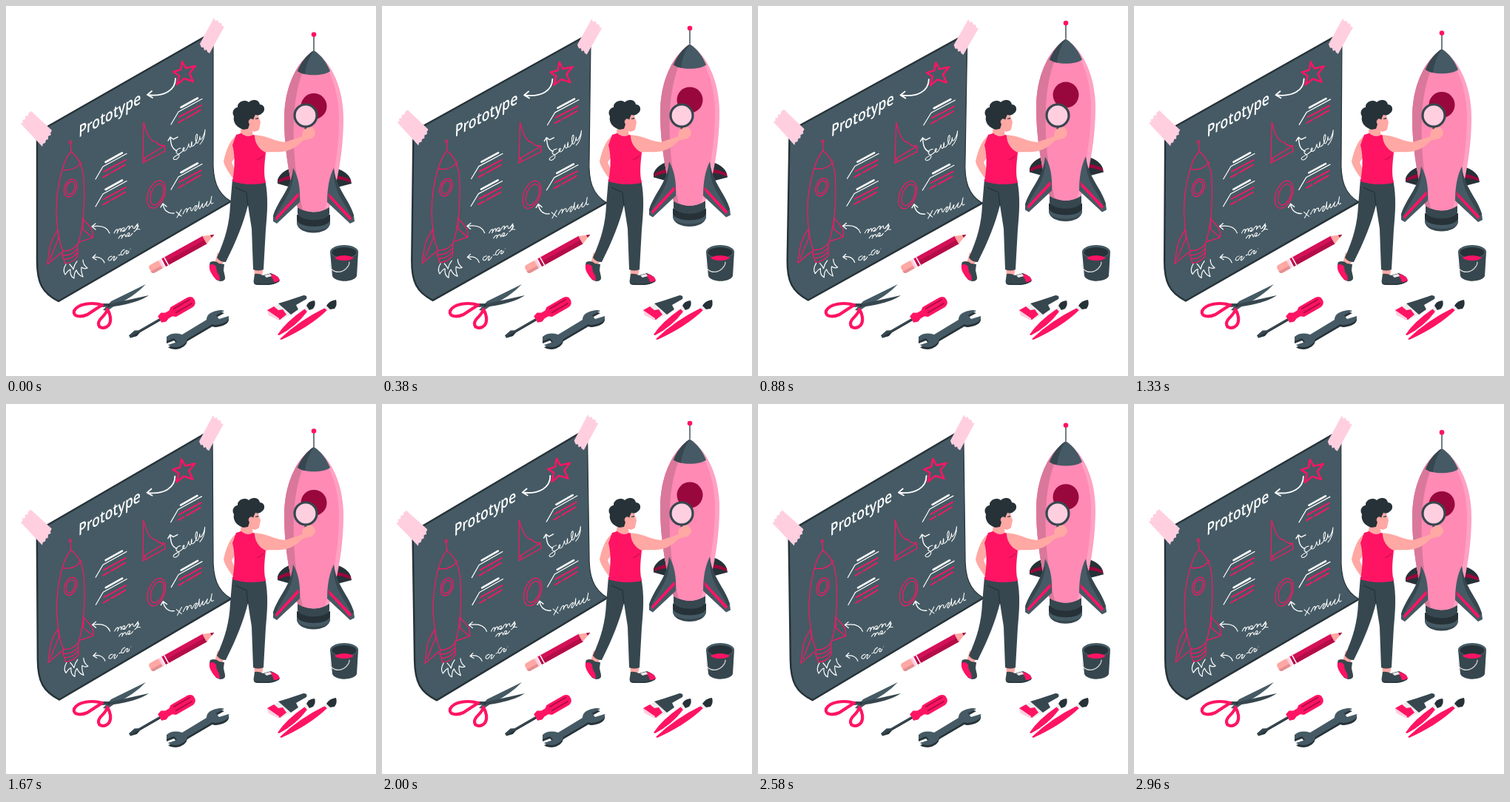
Animation of 500 by 500 pixels, one loop 3 s. Source, as an HTML page:

```html
<!DOCTYPE html>
<html lang="en">
<head>
<meta charset="utf-8">
<title>Rocket prototype</title>
<style>
  html, body { margin: 0; width: 100%; height: 100%; overflow: hidden; background: #fff; }
  svg { display: block; width: 100%; height: 100%; }
  .slate { fill: #455a64; } .dark { fill: #37474f; } .ink { fill: #263238; }
  .pink { fill: #ff1464; } .wine { fill: #99083c; } .pale { fill: #ffcfe0; } .skin { fill: #ffa8a4; }
  .metal { fill: #ececec; }
  .line { fill: none; stroke-linecap: round; stroke-linejoin: round; }
  .white { stroke: #fff; } .rose { stroke: #ff1464; }
  .title { font: 600 22.5px "Open Sans", sans-serif; fill: #fff; }
</style>
</head>
<body>
<svg viewBox="0 0 500 500" stroke-width="1.2">
  <defs>
    <g id="note" class="line">
      <path class="white" d="M121 234L131 217L163 199.500"/>
      <path class="white" stroke-width="2.600" d="M134.500 211L157 198.500"/>
      <path class="rose" stroke-width="1.800" d="M132 224L162 208M131 231.500L139 227M142 225.500L161 214.500"/>
    </g>
    <path id="spanner" d="M217 448Q225 441 238 445L271 425Q271 416 284 413Q291 411 295 413L284 419L288 424L301 420Q302 428 289 431Q282 433 279 431L245 451Q243 460 230 462Q222 462 219 459L231 455L227 450L217 454Z"/>
  </defs>

  <g id="poster">
    <path class="slate" d="M42 171L280 35V205C279 235 285 253 304 264L71 399C49 388 42 374 42 345Z"/>
    <path class="line" stroke="#263238" stroke-width="2.400" d="M280 35L42 171V345C42 374 49 388 71 399L304 264"/>
    <path class="line" stroke="#263238" d="M280 35V205C279 235 285 253 304 264"/>
    <text class="title" transform="matrix(.785 -.435 -.03 1 98 178)">Prototype</text>

    <use href="#note"/>
    <use href="#note" y="37"/>
    <use href="#note" x="102" y="-74"/>
    <use href="#note" x="102" y="14"/>

    <g class="line rose">
      <path stroke-width="2.500" d="M238 75L243 84L256 81L248 91L253 102L241 98L231 106L234 94L226 89L236 86Z"/>
      <circle cx="87" cy="184" r="1.700"/>
      <path d="M87 186L88 197M88 197C79 205 68 239 68 278C69 303 72 320 77 331Q89 332 97 322C105 300 107 264 105 232C103 213 96 203 88 197M76 221Q93 224 102 211"/>
      <ellipse cx="87" cy="246" rx="8" ry="12.500" transform="rotate(20 87 246)"/>
      <ellipse cx="87" cy="246" rx="5.500" ry="9" transform="rotate(20 87 246)"/>
      <path d="M70 303C64 312 59 320 58 334L56 349L75 333M70 303L71 314L59 343M104 287C108 295 119 298 117 313L99 319M104 287V302L117 313"/>
      <path d="M77 331L76 337Q89 338 97 328V322M76 337L78 342Q89 343 97 333V328M78 342L80 348Q91 347 97 338V333"/>
      <path d="M186 157L185 212L215 196L214 188Q208 190 203 184C194 183 190 172 186 157M186 206L214 189M188 205V209"/>
      <ellipse cx="203" cy="254.500" rx="11" ry="19.500" transform="rotate(20 203 254.500)"/>
      <ellipse cx="204" cy="254.500" rx="8" ry="15" transform="rotate(20 204 254.500)"/>
    </g>

    <g class="line white">
      <path d="M81 349Q76 357 80 363Q84 357 87 356Q86 365 92 368Q92 360 95 357Q98 364 104 366Q101 358 102 353Q106 356 110 354Q104 350 104 343M86 349Q89 352 91 356Q92 350 96 345"/>
      <path stroke-width="1.800" d="M229 98C229 113 215 123 191 120M197 115L191 120L198 124"/>
      <path d="M140 307C137 299 128 296 116 298M121 294L116 298L121 302M133 347C131 341 125 338 117 340M121 336L117 340L122 343"/>
      <path stroke-width="1.400" d="M231 196C223 192 223 186 222 177M219 182L222 177L226 180L232 177M227 280C219 281 213 276 212 267M209 272L212 267L217 271"/>
      <g stroke-width="1">
        <path d="M146 307q3-6 5-5q0 3-1 5q3-7 5-6q0 2 0 4q2-6 5-5q1 3-3 4q3 2 6-4q3-4 4-2q-1 3-1 4q3-5 5-5q0 5 3 3q3-5 4-6q0 8-5 11"/>
        <path d="M152 314q3-5 5-4q0 2-1 4q3-6 5-5q0 2 1 3q3-7 5-5q0 3-3 4q4 1 7-4M174 299q4-4 5-2q0 2-3 5q4-1 5 0"/>
        <path d="M143 338q-5 1-5 5q3 3 6-3q3-3 3-1q-3 5-1 5q3-2 4-5M152 337l2-1M160 329q-5 2-5 7q3 2 5-3q3-4 4-2q-3 4-1 4q3-1 3-4M168 328v0"/>
        <path d="M236 192C228 194 229 199 233 200C237 203 228 211 226 206C227 202 238 200 241 193C242 189 237 193 240 196C244 197 246 190 247 186Q247 191 249 191Q252 188 251 183Q249 191 253 189C258 186 260 173 258 173C255 176 256 187 259 185Q262 181 262 176Q262 182 264 180Q268 175 269 167Q269 180 262 187"/>
        <path d="M230 278l7 6M237 275l-6 11M239 281q4-9 6-7q-1 4-1 5q3-8 6-6q-1 4 1 4q5-9 7-7q-5 7-2 7q4-4 5-13q-1 11 1 10q4-8 4-7q-2 6 1 5q4-6 5-8q-3 8 1 6q4-4 5-13q-3 14 2 9"/>
      </g>
    </g>
    <path class="pale" d="M34 142L62 168L60 172L61 174L57 176L57 180L54 181L53 185L50 186L49 190L20 159L23 157L22 154L26 153L26 149L30 148L30 145Z"/>
    <path class="pale" d="M281 16L283 20L286 19L288 23L291 23L292 27L295 28L275 64L272 62L271 59L268 60L267 56L264 56L262 51Z"/>
  </g>

  <g id="rocket">
    <path d="M416 39V60" stroke="#37474f" stroke-width="1.400"/>
    <circle class="pink" cx="416" cy="38.500" r="3.300"/>
    <path class="ink" d="M386 219C376 222 369 228 367 235V240L392 247ZM445 219C456 222 464 228 466 235L467 240L440 247Z"/>
    <path class="wine" d="M368 235Q378 229 390 229V234Q378 234 368 239ZM466 235Q456 229 443 229V234Q456 234 466 239Z"/>

    <path class="dark" d="M393 282V293C394 311 437 311 438 293V282Z"/>
    <path class="slate" d="M393 290V294C396 306 436 306 438 294V290Z"/>
    <path class="ink" d="M393 283V289C396 301 436 301 438 289V283Z"/>
    <path class="dark" d="M394 271V281C400 292 432 292 437 281V271Z"/>

    <path fill="#ffa1c3" d="M416 60C391 77 376 112 376 153C376 195 384 239 394 272Q416 285 437 272C448 239 456 195 456 153C456 112 441 77 416 60Z"/>
    <path fill="#ff8ab4" d="M416 60C391 77 376 112 376 153C376 195 384 239 394 272Q414 283 431 275C442 239 450 195 450 153C450 115 437 80 416 60Z"/>
    <path fill="#d9789b" d="M416 60C391 77 376 112 376 153C376 195 384 239 394 272L401 276C392 235 387 193 389 153C390 120 399 82 416 60Z"/>
    <path class="slate" d="M416 60C405 67 398 78 394 88C402 95 430 95 438 88C434 78 427 67 416 60Z"/>
    <path class="dark" d="M416 60C405 67 398 78 394 88Q398 91 404 92Q406 74 416 60Z"/>
    <circle class="wine" cx="416" cy="135.500" r="17.500"/>

    <path class="slate" d="M388 219C387 245 367 263 361 284V291L366 294L397 265C398 246 395 230 388 219Z"/>
    <path class="dark" d="M388 219C387 245 367 263 361 284L364 286C371 267 391 251 388 219Z"/>
    <path class="pink" d="M364 286L395 252L396 257L365 290Z"/>
    <path class="slate" d="M443 219C445 245 464 262 470 283L471 291L465 294L434 265C434 246 437 230 443 219Z"/>
    <path class="dark" d="M443 219C445 245 464 262 470 283L467 286C460 267 441 253 443 219Z"/>
    <path class="pink" d="M467 286L436 253V258L465 290Z"/>
  </g>

  <g id="person">
    <path class="skin" d="M286 333L282 348L291 352L296 340ZM335 352L336 365H346L348 352Z"/>
    <path class="dark" d="M276 346Q283 343 288 348L295 349L294 357L296 366Q297 372 289 372L284 370Q272 354 276 346Z"/>
    <path class="pink" d="M275 350Q280 347 284 352Q284 359 288 364L289 371Q283 371 278 362Q274 356 275 350Z"/>
    <path class="dark" d="M336 362Q342 361 347 364L358 361Q369 365 370 371Q366 376 355 377H339Q333 376 335 369Z"/>
    <path class="pink" d="M359 362Q369 365 370 371Q366 374 362 373Q361 367 356 364Z"/>
    <path class="metal" d="M349 364L357 362L359 365L352 367Z"/>
    <path d="M336 375Q354 379 369 372" fill="none" stroke="#263238"/>
    <path class="dark" d="M306 234H350C355 259 353 280 351 302L348 356Q341 359 334 356L332 301L327 269C321 293 312 316 297 346Q289 346 285 340C296 315 302 295 303 269Z"/>
    <path d="M327 270L325 252L310 245" fill="none" stroke="#263238"/>
    <path class="skin" d="M312 175C303 180 297 195 294 210Q295 217 306 232L312 229L305 211L315 196Z"/>
    <path class="skin" d="M334 174C353 175 363 183 377 184L401 176Q402 166 409 163L417 169Q419 175 413 179L401 182Q388 196 372 197C362 198 354 196 348 199L338 192Z"/>
    <path class="skin" d="M329 146L341 148L344 157L342 167Q338 171 333 169L334 178Q324 184 316 175L319 160Z"/>
    <path class="pink" d="M311 174L318 172Q326 179 334 174L336 175C336 185 342 194 351 198C349 216 348 226 351 239Q328 244 306 237C310 215 309 199 306 188Z"/>
    <path d="M348 202Q342 208 339 207" fill="none" stroke="#cc104f"/>
    <path class="ink" d="M321 167C313 165 306 158 308 149C304 143 309 137 313 137C312 130 322 125 328 130C333 125 342 126 343 133C350 133 351 142 346 145Q342 149 337 147L335 151L333 158L330 153Q326 155 329 160L327 166Z"/>
    <path class="skin" d="M335 154Q329 150 329 155Q329 160 333 161Z"/>
    <path class="ink" d="M337 152L341 151V152.500L337 153Z"/>
    <circle class="pale" cx="405" cy="148" r="15" stroke="#37474f" stroke-width="3.200"/>
    <path d="M405 164V170" stroke="#37474f" stroke-width="3"/>
    <path class="skin" d="M400 177Q400 166 407 165L413 163Q418 168 418 173Q414 178 406 180Z"/>
  </g>

  <g id="pencil" transform="translate(200 354) rotate(-29)">
    <rect class="skin" x="-6" y="-6" width="18" height="12" rx="4"/>
    <path fill="#e58f91" d="M-6 2H12V6H-2Q-6 6-6 2Z"/>
    <path class="pale" d="M10-6H16V6H10Z"/>
    <path fill="#d41057" d="M15-6H79V6H15Z"/>
    <path fill="#b30d48" d="M15 0H79V6H15Z"/>
    <path d="M14-6V6M19-6V6" stroke="#fff" stroke-width="1.500"/>
    <path class="skin" d="M78-6L93 0L78 6Z"/>
    <path class="wine" d="M88-2L93 0L88 2Z"/>
  </g>

  <g id="scissors">
    <path class="slate" d="M131 411L142 399L189 376Q173 393 147 405L137 412Z"/>
    <path class="dark" d="M126 402L143 402L193 391Q179 401 146 406L128 407Z"/>
    <g class="line rose" stroke-width="4.200">
      <path d="M130 404C116 400 97 402 92 412C90 420 101 421 110 417Q119 411 130 404Z"/>
      <path d="M137 410C141 416 143 425 139 431C134 437 125 436 125 429C125 422 134 420 137 410Z"/>
    </g>
    <circle class="ink" cx="139" cy="405" r="1.500"/>
  </g>

  <g id="screwdriver" transform="translate(167 447) rotate(-30)">
    <path class="dark" d="M0-2L10-4L15-1.500H49V1.500H15L9 4L0 2Z"/>
    <path class="ink" d="M1 1H49V2H15L9 4Z"/>
    <path class="pink" d="M47-5L53-7L58-4H64L68-7H94Q101-6 101 0Q101 7 94 8H68L64 5H58L53 7L47 5Z"/>
    <path d="M70-3H96M70 3H96" stroke="#b30d48" stroke-width="2"/>
  </g>

  <g id="wrench">
    <use href="#spanner" class="ink" y="2"/>
    <use href="#spanner" class="slate" y="-1"/>
  </g>

  <g id="brushes">
    <path class="metal" d="M353 411L372 401L388 415L371 425L355 418Z"/>
    <path class="pink" d="M353 411L362 406L368 411L374 410L379 417L370 424L355 416Z"/>
    <path class="pale" d="M353 411L369 422V425L355 418Z"/>
    <path class="dark" d="M368 402L381 398L402 391Q408 391 406 396L392 404L395 410L385 417Z"/>
    <path class="pink" d="M367 444Q378 427 404 409L407 413Q392 433 369 445Z"/>
    <path class="metal" d="M403 409L407 404L412 409L407 413Z"/>
    <path class="ink" d="M406 405Q408 399 417 398Q419 404 415 409L410 411Z"/>
    <path class="pink" d="M370 450Q396 425 431 408L434 411Q410 434 372 451Z"/>
    <path class="metal" d="M430 408L435 403L440 408L435 412Z"/>
    <path class="ink" d="M433 405Q437 398 446 397Q448 404 444 409L438 410Z"/>
  </g>

  <g id="bucket">
    <path class="dark" d="M438 332L441 365C445 374 470 374 474 365L476 332Z"/>
    <ellipse class="slate" cx="457" cy="332" rx="19" ry="9"/>
    <ellipse class="ink" cx="457" cy="333" rx="16.500" ry="7"/>
    <path class="pink" d="M444 340Q457 334 470 340Q467 344 457 344Q447 344 444 340Z"/>
    <path class="line" stroke="#e0e0e0" d="M438 349C438 359 449 362 457 357Q464 352 464 346"/>
  </g>
</svg>
<script>
  const poster = document.getElementById('poster');
  const rocket = document.getElementById('rocket');
  const loop = 3000, sway = 1, lift = 16.6;

  // The poster sways once per loop while the rocket hovers twice.
  function draw(now) {
    const angle = (now % loop) / loop * 2 * Math.PI;
    const rise = lift * (1 - Math.cos(2 * angle)) / 2;
    poster.setAttribute('transform', `rotate(${sway * Math.sin(angle)} 162 207)`);
    rocket.setAttribute('transform', `translate(0 ${-rise})`);
  }

  const start = performance.now();
  function tick() {
    draw(performance.now() - start);
    requestAnimationFrame(tick);
  }
  tick();
</script>
</body>
</html>
```
